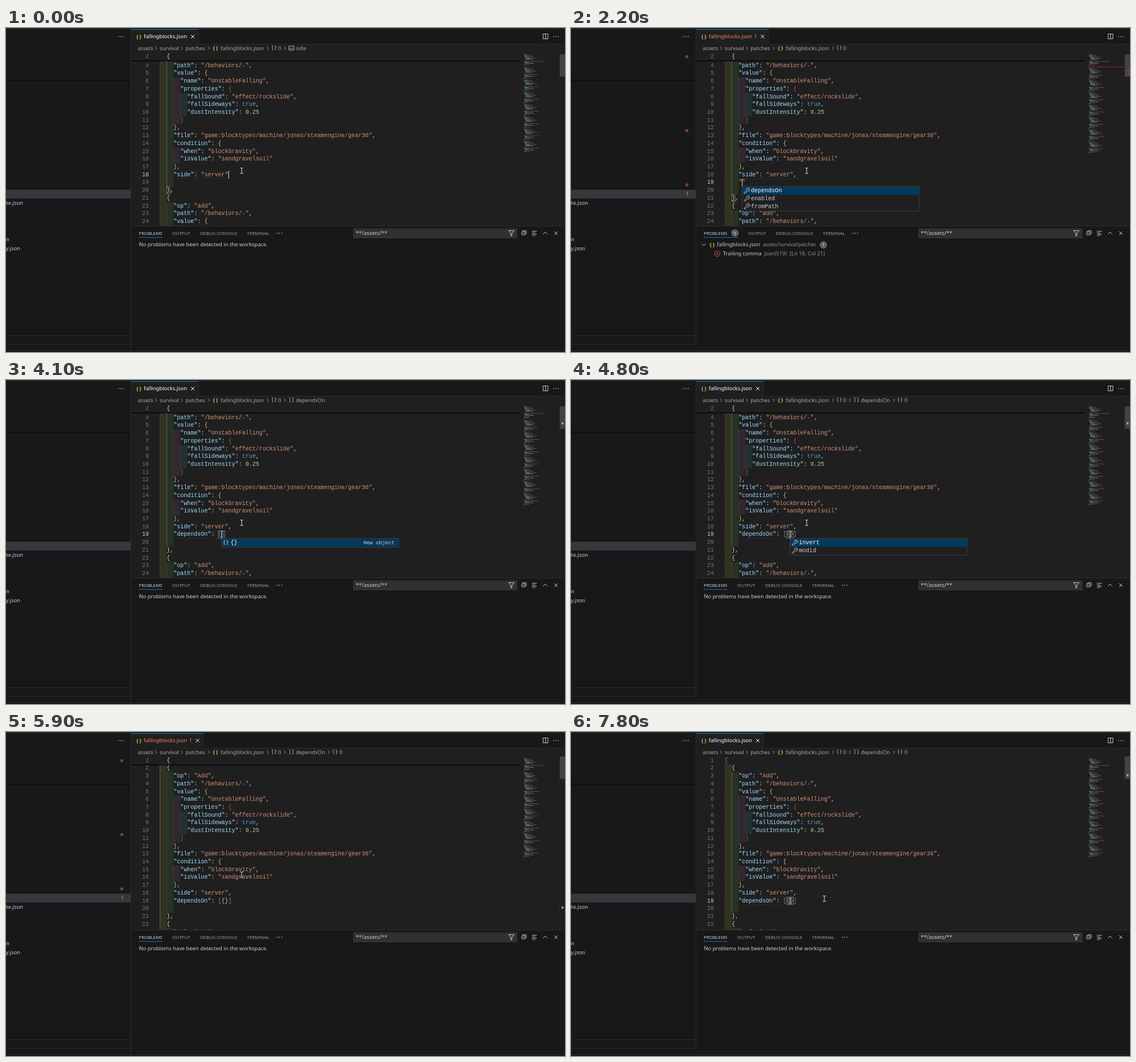
Animation, 982 px wide and 570 px high, one loop 8 s. Source, as an HTML page:

```html
<!DOCTYPE html>
<html lang="en">
<head>
<meta charset="utf-8">
<title>JSON editor</title>
<style>
html, body { margin: 0; width: 100%; height: 100%; overflow: hidden; background: #181818; }
svg { display: block; width: 982px; height: 570px; }
text { font-family: "Noto Sans", sans-serif; white-space: pre; }
.m { font-family: "Liberation Mono", monospace; }
</style>
</head>
<body>
<svg viewBox="0 0 982 570" xmlns="http://www.w3.org/2000/svg">
  <defs><clipPath id="view"><rect x="220" y="43" width="762" height="305"/></clipPath></defs>
  <g id="scene"></g>
  <g id="mouse" fill="none" stroke-linecap="round">
    <path d="M-2.5-5Q0-5 0-3.5Q0-5 2.5-5M0-4V4M-2.5 5Q0 5 0 3.5Q0 5 2.5 5" stroke="#111" stroke-width="2.4"/>
    <path d="M-2.5-5Q0-5 0-3.5Q0-5 2.5-5M0-4V4M-2.5 5Q0 5 0 3.5Q0 5 2.5 5" stroke="#ddd" stroke-width="1.1"/>
  </g>
</svg>
<script>
const LOOP = 8000, X0 = 270.2, CH = 6.02, LH = 13.72, TOP = 43.14, MONO = 10.03, UI = 9.4;
const BLUE = '#0078d4', GREY = '#a9a9a9', FG = '#cccccc', RED = '#f14c4c', SALMON = '#f88070';

// Drawing helpers; text y is the visual centre of the row
const text = (x, y, s, fill = FG, size = UI, more = '') =>
  `<text x="${x}" y="${y + size * .36}" font-size="${size}" fill="${fill}" ${more}>${s}</text>`;
const mono = (x, y, s, fill = FG, size = MONO, more = '') =>
  `<text class="m" x="${x}" y="${y + size * .267}" font-size="${size}" fill="${fill}" ${more}>${s}</text>`;
const rect = (x, y, w, h, fill, more = '') =>
  `<rect x="${x}" y="${y}" width="${w}" height="${h}" fill="${fill}" ${more}/>`;
const path = (d, stroke, w = 1, more = '') =>
  `<path d="${d}" fill="none" stroke="${stroke}" stroke-width="${w}" ${more}/>`;
const disc = (x, y, r, fill) => `<circle cx="${x}" cy="${y}" r="${r}" fill="${fill}"/>`;
const dots = (x, y, c = FG) => [-4, 0, 4].map(d => disc(x + d, y, .85, c)).join('');
const cross = (x, y, r = 3, c = FG) => path(`M${x - r} ${y - r}l${2 * r} ${2 * r}m0 ${-2 * r}l${-2 * r} ${2 * r}`, c);
const badge = (x, y) => disc(x, y, 6.5, '#616161') + text(x, y, '1', '#f8f8f8', 7.9, 'text-anchor="middle"');
const braces = (x, y, c = '#cbcb41') => text(x, y - .3, '{ }', c, 8.6, 'text-anchor="middle" font-weight="600"');

// Document
const patch = (op, file, tail) => [
  '  {', `    "op": "${op}",`, '    "path": "/behaviors/-",', '    "value": {',
  '      "name": "UnstableFalling",', '      "properties": {',
  '        "fallSound": "effect/rockslide",', '        "fallSideways": true,',
  '        "dustIntensity": 0.25', '      }', '    },', `    "file": "game:blocktypes/${file}",`,
  '    "condition": {', '      "when": "blockGravity",', '      "isValue": "sandgravelsoil"',
  '    },', ...tail, '  },'];
const others = ['stone/cobble', 'wood/supportbeam', 'soil/packeddirt', 'metal/scrapheap',
  'stone/looserock', 'soil/muddygravel', 'clay/rawbrick'];
const makeLines = s => ['[',
  ...patch('Add', 'machine/jonas/steamengine/gear36',
    ['    "side": "server"' + (s.comma ? ',' : ''), ...(s.extra == null ? [] : ['    ' + s.extra]), '    ']),
  ...others.flatMap(f => patch('add', f, ['    "side": "server"'])), ']'];

const CURLY = ['#d9d4b8', '#d7ba7d', '#8a6844'], SQUARE = ['#3d9be9', '#6a83d6'];
function tokenize(lines) {
  let c = 0, q = 0;
  return lines.map(line => [...line.matchAll(/"[^"]*"|true|[\d.]+|[{}\[\],:]/g)].map(m => {
    const s = m[0], end = m.index + s.length;
    let fill = FG;
    if (s[0] === '"') fill = line[end] === ':' ? '#9cdcfe' : '#ce9178';
    else if (s === 'true') fill = '#569cd6';
    else if (/\d/.test(s)) fill = '#b5cea8';
    else if (s === '{') fill = CURLY[c++ % 3];
    else if (s === '}') fill = CURLY[--c % 3];
    else if (s === '[') fill = SQUARE[q++ % 2];
    else if (s === ']') fill = SQUARE[--q % 2];
    return { s, col: m.index, fill };
  }));
}

// Timeline: each step changes some fields
const trailing = ['Trailing comma', 'json(519)', '[Ln 18, Col 21]', 335];
const colon = ['Colon expected', 'json(515)', '[Ln 21, Col 3]', 335];
const value = ['Value expected', 'json(516)', '[Ln 19, Col 30]', 335];
const zero = ['{ }', '0'], dep = ['[ ]', 'dependsOn'];
const keys = items => ({ x: 300.3, items });
const steps = [
  [0, { scroll: 25.2, sticky: 1, line: 18, col: 20, caret: 1, guide: 1, boxes: [[20, 2]], crumbs: [zero, ['abc', 'side']] }],
  [200, { caret: 0 }],
  [400, { comma: 1, col: 21, caret: 1 }],
  [500, { err: 1, badge: 1, msg: trailing, squig: [18, 20], mark: 18 }],
  [800, { extra: '', line: 19, col: 4, boxes: [[21, 2]] }],
  [1000, { crumbs: [zero] }],
  [1400, { caret: 0 }],
  [1900, { caret: 1 }],
  [2200, { extra: '""', col: 5, squig: [21, 2], mark: 21, pop: keys(['dependsOn', 'enabled', 'fromPath']) }],
  [2300, { msg: colon }],
  [2500, { extra: '"d"', col: 6, pop: keys(['dependsOn', 'enabled']) }],
  [2900, { extra: '"dependsOn": []', col: 18, pop: 0, badge: 0, squig: 0, mark: 0, boxes: [[21, 2], [19, 18]] }],
  [3000, { msg: 0, boxes: [[19, 17], [19, 18]] }],
  [3100, { err: 0 }],
  [3200, { gray: 19 }],
  [3400, { crumbs: [zero, dep] }],
  [3600, { caret: 0 }],
  [4100, { caret: 1, pop: { x: 378.6, items: ['{}'], detail: 'New object' } }],
  [4400, { extra: '"dependsOn": [{}]', col: 19, pop: 0, boxes: [[19, 18], [19, 19]] }],
  [4800, { pop: { x: 384.6, items: ['invert', 'modid'] }, crumbs: [zero, dep, zero] }],
  [5200, { extra: '"dependsOn": [{"invert": }]', col: 29, pop: 0, boxes: [[19, 18], [19, 29]] }],
  [5300, { err: 1, badge: 1, msg: value, squig: [19, 29], mark: 19 }],
  [5600, { caret: 0 }],
  [5900, { extra: '"dependsOn": [{}]', line: 148, boxes: [], badge: 0, msg: 0, squig: 0, mark: 0, scroll: 0, guide: 0, gray: 148 }],
  [6000, { err: 0 }],
  [6200, { sticky: 0 }],
  [6300, { crumbs: [['', '…']], boxes: [[1, 0]] }],
  [7700, { line: 19, col: 19, caret: 1, guide: 1, gray: 19, boxes: [[19, 18], [19, 19]] }],
  [7800, { crumbs: [zero, dep, zero] }]
];
const states = [];
steps.forEach(([, change], i) => states.push({ ...states[i - 1], ...change }));

function sidebar(s) {
  let o = rect(0, 91.5, 219, 1.5, '#0a0a0a') + rect(0, 284.5, 219, 15.5, '#37373d');
  o += dots(202, 15) + text(.3, 308, 'te.json') + text(.3, 371.5, 'n') + text(-.2, 387.7, 'y.json');
  o += [541, 556].map(y => rect(0, y, 219, 1, '#2b2b2b')).join('');
  if (s.err) o += [50.5, 180.5, 276].map(y => disc(203.5, y, 2.8, '#7f3c38')).join('') + text(202, 292, '1', SALMON, 8.5);
  return o + rect(219, 2, 1, 565, '#2b2b2b');
}

function header(s) {
  const w = s.err ? 127.5 : 119, c = s.err ? SALMON : '#ffffff';
  let o = rect(0, 1, 982, 1, '#2b2b2b') + rect(220, 28, 762, 1, '#2b2b2b');
  o += rect(220, 2, w - 1, 27, '#1f1f1f') + rect(219 + w, 2, 1, 27, '#2b2b2b') + rect(220, 2, w - 1, 1, BLUE);
  o += braces(233.5, 15) + text(242, 15, 'fallingblocks.json', c);
  if (s.err) o += text(322, 15, '1', c, 8.5);
  o += cross(219 + w - 10, 15, 3, '#fff');
  o += path('M943.5 10.5h8.5v8.5h-8.5zM947.8 10.5v8.5', FG) + dots(966, 15);

  const chevron = x => path(`M${x - 1.5} 32.5l3 3l-3 3`, GREY, .9);
  o += text(231, 35.5, 'assets', GREY) + text(270, 35.5, 'survival', GREY) + text(315.3, 35.5, 'patches', GREY);
  o += [263.5, 309, 356, 460].map(chevron).join('') + braces(368, 35.5) + text(377, 35.5, 'fallingblocks.json', GREY);
  const at = [[0, 471, 478], [490, 501.5, 509.3], [567, 578, 585.8]];
  s.crumbs.forEach(([icon, label], i) => {
    const [sep, ix, tx] = at[i];
    if (sep) o += chevron(sep);
    if (icon === 'abc') o += path('M497 31.8h9v7h-9z', FG, .9) + text(501.5, 35.2, 'abc', FG, 4, 'text-anchor="middle"');
    else o += text(ix, 35.2, icon, FG, 8.6, 'text-anchor="middle"');
    o += text(icon ? tx : 467, 35.5, label, GREY);
  });
  return o;
}

const TINT = ['255,255,64', '127,255,127', '255,127,255', '79,236,236'];
function editor(s) {
  const lines = makeLines(s), tokens = tokenize(lines);
  const rowTop = n => TOP + (n - 1) * LH - s.scroll;
  const colX = c => X0 + c * CH;
  const rowText = (n, mid) => mono(251, mid, n, n === s.line ? FG : '#6e7681', MONO, 'text-anchor="end"') +
    tokens[n - 1].map(k => mono(colX(k.col), mid, k.s, k.fill)).join('');
  let o = '';
  const count = s.scroll ? 25 : 23;
  for (let n = 1; n <= count; n++) {
    const y = rowTop(n), depth = lines[n - 1].search(/\S|$/) / 2;
    for (let d = 0; d < depth; d++) {
      const on = d === s.guide && (d === 0 || n < (s.extra == null ? 20 : 21));
      o += rect(colX(d * 2), y, 2 * CH, LH + .05, `rgba(${TINT[d]},.085)`);
      o += rect(colX(d * 2), y, .8, LH + .05, on ? '#707070' : '#404040');
    }
    if (n === s.line) o += path(`M270 ${y + .4}H903M270 ${y + LH - .4}H903`, '#2b2b2b', .9);
    o += rowText(n, y + LH / 2);
  }
  for (const [n, c] of s.boxes)
    o += rect(colX(c) + .3, rowTop(n) + .4, CH - .3, LH - .8, 'rgba(0,100,0,.1)', 'stroke="#888" stroke-width=".75"');
  if (s.squig) {
    const [n, c] = s.squig;
    o += path(`M${colX(c)} ${rowTop(n) + 12.6}l1.5-1.6l1.5 1.6l1.5-1.6l1.5 1.6`, RED, .9);
  }
  if (s.caret) o += rect(colX(s.col) - .2, rowTop(s.line), 1.4, LH, '#aeafad');
  if (s.sticky)
    o += rect(220, 43, 683, 14.5, '#1f1f1f') + rowText(2, TOP + LH / 2) + rect(220, 57, 683, 1.5, '#060606');
  return `<g clip-path="url(#view)">${o}${minimap(s, tokens)}</g>`;
}

function minimap(s, tokens) {
  const strokes = {};
  tokens.forEach((row, i) => row.forEach(k => {
    strokes[k.fill] = (strokes[k.fill] || '') + `M${(908 + k.col * .6).toFixed(1)} ${(44.6 + i * 1.2).toFixed(1)}h${(k.s.length * .6).toFixed(1)}`;
  }));
  let o = Object.entries(strokes).map(([c, d]) => path(d, c, .85, 'opacity=".48"')).join('');
  const ruler = n => 43 + n / 169 * 305;
  if (s.mark) o += rect(908, 43.4 + s.mark * 1.2 - .8, 64, 1.1, '#a02424');
  o += rect(972, 43, .7, 305, '#2b2b2b') + rect(973, 43 + s.scroll * .1315, 9, 39.5, '#434343');
  if (s.mark) o += rect(973, 74.8, 9, 1, '#6a6a6a') + rect(979, ruler(s.mark) - 2, 3, 2.4, '#c03030');
  if (s.gray) o += rect(976, ruler(s.gray) - 2.8, 3.4, 3.6, '#a0a0a0');
  return o;
}

function popup(p) {
  const y = 279, w = 311.5, obj = p.detail;
  let o = rect(p.x, y, w, p.items.length * LH + 1.8, '#202020', 'stroke="#454545" stroke-width=".8"');
  o += rect(p.x + .5, y + .7, w - 1, LH, '#04395e');
  p.items.forEach((label, i) => {
    const mid = y + .7 + LH * (i + .5), x = p.x + 4;
    o += obj ? text(x + 3.6, mid - .4, '{ }', '#fff', 8.6, 'text-anchor="middle"')
      : path(`M${x} ${mid + 3}l4-4c-1-3 1.5-5 4-4l-2 2l1.5 1.5l2-2c1 3-1.500 4.700-4 4l-4 4q-1.500 .5-1.500-1.500z`, FG, .9);
    o += mono(p.x + 16, mid, label, i ? FG : '#fff');
  });
  if (obj) o += mono(p.x + w - 7.6, y + LH / 2 + .7, obj, FG, 9.1, 'text-anchor="end"');
  return o;
}

function panel(s) {
  const dx = s.badge ? 19 : 0;
  let o = rect(220, 348, 762, 222, '#181818') + rect(220, 348, 762, 1, '#2b2b2b');
  o += text(233.5, 361, 'PROBLEMS', FG, 7.95) + rect(233, 368, s.badge ? 62 : 42, 1, BLUE);
  if (s.badge) o += badge(288, 360.7);
  [[292, 'OUTPUT'], [341, 'DEBUG CONSOLE'], [423.5, 'TERMINAL']].forEach(([x, l]) => o += text(x + dx, 361, l, '#9d9d9d', 7.95));
  o += dots(480.5 + dx, 361);
  o += rect(610, 352.500, 288.5, 17.5, '#313131', 'rx="1.500"') + text(614.5, 361, '**/assets/**');
  o += path('M883 356.5h9.500l-3.700 4.500v4l-2 1v-5z', FG);
  o += path('M908 358v-1.500h6v5.500h-1.500M906 358.5h6v5.500h-6zM907.5 361.300h3', FG, .9);
  o += path('M924 357.500h8.500M924 360h6M924 362.5h8.5M924 365h6', FG, .9);
  o += path('M943.500 362.500l3.700-3.500l3.700 3.500', FG) + cross(966, 361);
  if (!s.msg) return o + text(233.5, 381, 'No problems have been detected in the workspace.');
  const [label, code, pos, x] = s.msg, end = label[0] === 'T' ? x + 4 : x + 4.300;
  o += path('M230 379.5l3.300 3.300l3.300-3.300', FG) + braces(248, 381) + text(256.3, 381, 'fallingblocks.json');
  o += text(337.3, 381.2, 'assets/survival/patches', '#929292', 8.5) + badge(443.3, 381.5);
  o += `<circle cx="257" cy="397" r="4.600" fill="none" stroke="${RED}"/>` + cross(257, 397, 1.7, RED);
  return o + text(266.8, 397, label) + text(end, 397, code, '#929292') + text(384, 397, pos, '#929292');
}

const scene = document.getElementById('scene'), mouse = document.getElementById('mouse');
function render(s) {
  scene.innerHTML = rect(0, 0, 982, 570, '#181818') + rect(220, 29, 762, 319, '#1f1f1f') + sidebar(s) + header(s) +
    editor(s) + panel(s) + rect(0, 567, 982, 1, '#2b2b2b') + (s.pop ? popup(s.pop) : '');
}

// Pointer route: time, x, y
const route = [[6750, 414, 251], [7100, 409, 290], [7400, 415, 313], [7650, 423, 304], [7700, 445, 293]];
function pointer(t) {
  const i = route.findIndex(p => p[0] > t);
  if (i === 0) return route[0].slice(1);
  if (i < 0) return route[route.length - 1].slice(1);
  const [t0, x0, y0] = route[i - 1], [t1, x1, y1] = route[i], k = (t - t0) / (t1 - t0);
  return [x0 + (x1 - x0) * k, y0 + (y1 - y0) * k];
}

let shown = -1;
const start = performance.now();
function tick() {
  const t = (performance.now() - start) % LOOP;
  const i = steps.findLastIndex(p => p[0] <= t);
  if (i !== shown) render(states[shown = i]);
  mouse.setAttribute('transform', `translate(${pointer(t)})`);
  requestAnimationFrame(tick);
}
tick();
</script>
</body>
</html>
```
